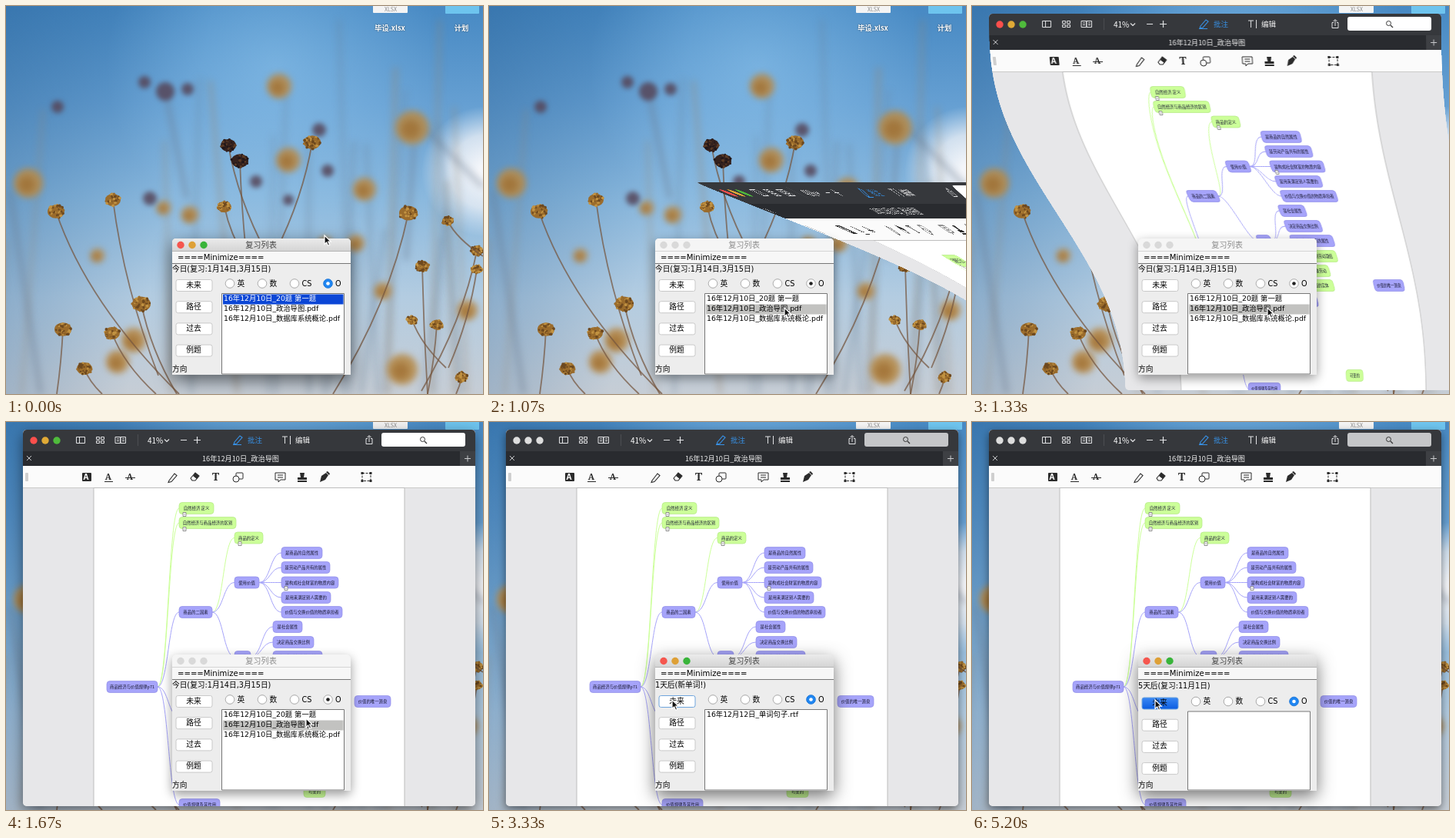
These frames come from a looping animation (620 by 504 pixels, 5.33 s). An HTML page with a canvas:

```html
<!DOCTYPE html>
<html lang="zh">
<head>
<meta charset="utf-8">
<title>复习列表</title>
<style>
html, body { margin: 0; width: 100%; height: 100%; overflow: hidden; }
canvas { display: block; width: 620px; height: 504px; }
</style>
</head>
<body>
<canvas id="stage" width="620" height="504"></canvas>
<script>
const W = 620, H = 504, LOOP = 5330;
const CJK = '"Noto Sans CJK SC", "Noto Sans CJK JP", sans-serif';
const UI = '"DejaVu Sans", ' + CJK;
const stage = document.getElementById('stage').getContext('2d');

let seed = 7;
const random = () => (seed = seed * 16807 % 2147483647) / 2147483647;
const clamp = u => Math.min(1, Math.max(0, u));
const smooth = u => u * u * (3 - 2 * u);

function layer(draw) {
  const canvas = document.createElement('canvas');
  canvas.width = W;
  canvas.height = H;
  draw(canvas.getContext('2d'));
  return canvas;
}
function text(c, str, x, y, size, color = '#000', align = 'left', family = UI, weight = '') {
  c.font = `${weight} ${size}px ${family}`;
  c.fillStyle = color;
  c.textAlign = align;
  c.textBaseline = 'middle';
  c.fillText(str, x, y);
}
function box(c, x, y, w, h, r, fill, stroke, line = 1) {
  c.beginPath();
  c.roundRect(x, y, w, h, r);
  if (fill) { c.fillStyle = fill; c.fill(); }
  if (stroke) { c.strokeStyle = stroke; c.lineWidth = line; c.stroke(); }
}
function dot(c, x, y, r, fill, stroke) {
  c.beginPath();
  c.arc(x, y, r, 0, 7);
  if (fill) { c.fillStyle = fill; c.fill(); }
  if (stroke) { c.strokeStyle = stroke; c.lineWidth = 1; c.stroke(); }
}
function path(c, d, stroke, line = 1, fill) {
  const p = new Path2D(d);
  if (fill) { c.fillStyle = fill; c.fill(p); }
  if (stroke) { c.strokeStyle = stroke; c.lineWidth = line; c.stroke(p); }
}
function shadow(c, x, y, w, h, blur, alpha) {
  c.save();
  c.shadowColor = `rgba(0,0,0,${alpha})`;
  c.shadowBlur = blur;
  c.shadowOffsetY = blur / 3;
  box(c, x, y, w, h, 5, '#ddd');
  c.restore();
}
function gradient(c, coords, ...colors) {
  const g = coords.length === 4 ? c.createLinearGradient(...coords) : c.createRadialGradient(...coords);
  colors.forEach((color, i) => g.addColorStop(i / (colors.length - 1), color));
  return g;
}

// x, y, radius of out-of-focus heads
const hazy = [[29,230,19],[355,104,16],[528,158,22],[367,200,16],[119,324,9],[239,271,11],
  [466,238,15],[145,462,15],[166,434,16],[515,472,20],[490,370,11],[600,395,13],[455,308,11],[205,262,9],[415,308,9]];
const hazyDark = [[180,99,8],[207,111,12],[236,108,8],[67,131,8],[407,161,9],[187,250,9],[325,228,8],[418,214,8],[367,252,7]];
// x, y, radius, then where the stem leaves the picture
const flowers = [[65,267,11,225,504],[139,252,10,198,480],[284,261,9,312,330],[398,177,11,350,320],
  [523,269,12,425,504],[541,338,9,548,504],[612,318,8,540,500],[74,420,11,66,504],[176,387,12,222,504],
  [102,471,10,125,504],[528,408,7,572,470],[560,414,8,548,504],[574,279,7,620,325],[612,342,7,575,470],
  [138,425,10,195,504],[592,482,8,585,504]];
const darkFlowers = [[289,181,10,338,320],[304,201,11,312,320]];

function flower(c, [x, y, r, ex, ey], tones) {
  path(c, `M${x} ${y}Q${x + (ex - x) * .25} ${(y + ey) / 2} ${ex} ${ey}`, '#76563fbb', 1.8);
  c.save();
  c.translate(x, y);
  c.beginPath();
  c.ellipse(0, 0, r, r * .8, 0, 0, 7);
  c.fillStyle = tones[1];
  c.fill();
  for (let i = 0; i < 45; i++) {
    const a = random() * 6.3, d = Math.sqrt(random()) * r;
    dot(c, Math.cos(a) * d, Math.sin(a) * d * .8, 1 + random(), tones[Math.floor(random() * 3)]);
  }
  c.restore();
}

const desktop = layer(c => {
  c.fillStyle = gradient(c, [0, 0, 0, H], '#4789c3', '#659fd2', '#8bb9de', '#b3cce1', '#c6cdd5');
  c.fillRect(0, 0, W, H);
  c.fillStyle = gradient(c, [0, 0, 260, 60], '#245b9066', '#245b9000');
  c.fillRect(0, 0, W, H);
  c.fillStyle = gradient(c, [350, 80, 0, 350, 80, 220], '#9bd0f577', '#9bd0f500');
  c.fillRect(0, 0, W, H);
  c.fillStyle = gradient(c, [625, 215, 10, 625, 215, 85], '#f4f6fa', '#e9eef5cc', '#dce8f500');
  c.fillRect(0, 0, W, H);
  c.filter = 'blur(5px)';
  for (let i = 0; i < 22; i++) {
    const x = random() * W, y = random() * 330;
    path(c, `M${x} ${y}L${x + random() * 80 - 40} ${H}`, i % 3 ? '#6a7f9455' : '#9a866c66', 3 + random() * 4);
  }
  path(c, 'M545 160L620 235M5 240L45 504M530 180L520 330M207 110L235 250', '#6c788b88', 5);
  c.filter = 'blur(4px)';
  hazy.forEach(([x, y, r]) => {
    dot(c, x, y, r, '#b78b4be0');
    dot(c, x - 2, y + 2, r * .55, '#9c6a2daa');
  });
  c.filter = 'blur(3px)';
  hazyDark.forEach(([x, y, r]) => dot(c, x, y, r, '#55465add'));
  c.filter = 'blur(.6px)';
  flowers.forEach(f => flower(c, f, ['#c29342', '#9b6c2c', '#6e491f']));
  darkFlowers.forEach(f => flower(c, f, ['#5c3b25', '#35221e', '#221719']));
  c.filter = 'none';

  box(c, 477, -8, 45, 17, 1, '#f4f4f4');
  text(c, 'XLSX', 500, 4, 7, '#888', 'center', CJK);
  box(c, 571, -8, 44, 18, 1, '#6ec4ee');
  c.shadowColor = '#0008';
  c.shadowBlur = 2;
  text(c, '毕设.xlsx', 499, 28, 9.3, '#fff', 'center', CJK, 'bold');
  text(c, '计划', 592, 28, 9.3, '#fff', 'center', CJK, 'bold');
});

const PURPLE = '#a6a4fa', GREEN = '#ccff99';
// label, left, right, y, parent index, color
const nodes = [
  ['商品经济与价值规律p71', 131, 197, 344, -1, PURPLE],
  ['自然经济 定义', 225, 270, 112, 0, GREEN],
  ['自然经济与商品经济的区别', 225, 299, 131, 0, GREEN],
  ['商品的二因素', 225, 268, 247, 0, PURPLE],
  ['商品的定义', 297, 334, 150.5, 3, GREEN],
  ['使用价值', 297, 329, 208.5, 3, PURPLE],
  ['价值', 297, 318, 305, 3, PURPLE],
  ['是商品的自然属性', 358, 411, 170, 5, PURPLE],
  ['是劳动产品共有的属性', 358, 421, 189, 5, PURPLE],
  ['是构成社会财富的物质内容', 358, 432, 208.5, 5, PURPLE],
  ['是用来满足别人需要的', 358, 422, 228, 5, PURPLE],
  ['价值与交换价值的物质承担者', 358, 437, 247, 5, PURPLE],
  ['是社会属性', 347, 385, 266, 6, PURPLE],
  ['决定商品交换比例', 347, 400, 286, 6, PURPLE],
  ['商品经济特有的属性', 347, 411, 305, 6, PURPLE],
  ['人类无差别劳动凝结', 347, 408, 325, 6, GREEN],
  ['抽象劳动', 358, 390, 344, 6, GREEN],
  ['价值的实体', 347, 390, 363, 6, GREEN],
  ['劳动二重性', 225, 264, 383, 0, PURPLE],
  ['具体劳动与抽象劳动', 297, 358, 383, 18, PURPLE],
  ['价值量', 297, 325, 402, 18, PURPLE],
  ['价值的唯一源泉', 453, 500, 363, -1, PURPLE],
  ['可变的', 387, 415, 480, -1, GREEN],
  ['价值规律及其作用', 225, 278, 497, 0, PURPLE]
];

function mindMap(c) {
  nodes.forEach(([, left, , y, parent, color]) => {
    if (parent < 0) return;
    const [, , px, py] = nodes[parent], mid = (px + left) / 2;
    path(c, `M${px} ${py}C${mid} ${py} ${mid} ${y} ${left} ${y}`, color, 1);
  });
  nodes.forEach(([label, left, right, y, , color]) => {
    box(c, left, y - 7.5, right - left, 15, 4, color, color === GREEN ? '#b5e886' : '#918fe8', .7);
    text(c, label, (left + right) / 2, y, 5.4, '#181830', 'center', CJK, '500');
  });
  [[232, 120], [232, 139], [304, 158], [364, 216]].forEach(([x, y]) => {
    box(c, x - 2, y - 2.5, 4, 5, 0, '#fff', '#777', .8);
    path(c, `M${x - 1} ${y}h2`, '#777', .6);
  });
}

function lights(c, x, y, colors) {
  colors.forEach((color, i) => dot(c, x + i * 15, y, 4.7, color));
}

const reader = active => layer(c => {
  const pale = '#e2e3e5', blue = '#3792e8', ink = '#2b2b2b';
  box(c, 22, 10, 588, 489, 5);
  c.clip();
  c.fillStyle = '#e7e7e9';
  c.fillRect(22, 10, 588, 489);
  c.fillStyle = '#36383c';
  c.fillRect(22, 10, 588, 28);
  c.fillStyle = '#292b2f';
  c.fillRect(22, 38, 588, 19);
  c.fillStyle = '#3e4044';
  c.fillRect(590, 38, 20, 19);
  c.fillStyle = '#fbfbfb';
  c.fillRect(22, 57, 588, 28);
  c.fillStyle = '#c9c9c9';
  c.fillRect(22, 85, 588, 1);
  box(c, 114, 85.5, 404, 430, 0, '#fff', '#bdbdbd');

  lights(c, 36, 24, active ? ['#fc4f4c', '#e0aa36', '#4fbb3c'] : ['#dedede', '#dedede', '#dedede']);
  path(c, 'M91.500 19.500h11v8h-11zM95.500 19.500v8M117.500 19.500h4v3h-4zM123.500 19.500h4v3h-4zM117.500 24.500h4v3h-4zM123.500 24.500h4v3h-4z', pale);
  path(c, 'M142 19.500h6.500v8h-6.500zM149 19.500h6.500v8h-6.500zM144 22h3M144 24.500h3M151 22h3M151 24.500h3', pale);
  path(c, 'M171.500 16v15', '#4c4e52');
  text(c, '41%', 184, 24, 10, '#fff', 'left', CJK);
  path(c, 'M206 22.500l3 3 3-3M227 23.500h8M244 23.500h9M248.500 19v9', pale, 1.2);
  path(c, 'M297 26l7-8 3 2-7 8-4 1zM295 29.500h11', blue, 1.1);
  text(c, '批注', 314, 23.5, 9.5, blue, 'left', CJK);
  path(c, 'M359 19h7M362.500 19v9M369.500 18v11', pale);
  text(c, '编辑', 376, 23.5, 9.5, '#f4f4f4', 'left', CJK);
  path(c, 'M470 21.500h-2v7h8v-7h-2M472 26v-8M469.500 20l2.500-2.500 2.500 2.500', pale);
  box(c, 488, 14, 109, 18, 3, active ? '#fff' : '#c5c6c8');
  dot(c, 541.5, 22.5, 3, null, '#333');
  path(c, 'M544 25l3 3M', '#333', 1.2);

  path(c, 'M27 44l6 6M33 44l-6 6M596 47.500h8M600 43.500v8', '#c9cacc');
  text(c, '16年12月10日_政治导图', 305, 47.5, 9.2, '#f0f0f0', 'center', CJK);

  box(c, 25, 66, 4, 11, 1, '#cfcfcf');
  box(c, 99, 66, 12, 11, 1, ink);
  text(c, 'A', 104, 72, 10, '#fff', 'center', 'Inter, sans-serif', 'bold');
  ['A', 'A'].forEach((a, i) => text(c, a, 133 + i * 28, 71.5, 11, ink, 'center', '"Noto Serif", serif', 'bold'));
  path(c, 'M128 77.500h11M155 72.500h13', ink, 1.2);
  path(c, 'M212 76l7-9 3 2.500-7 8-4 1zM240 73l6-7 5 4-5 6h-4z', ink, 1.1);
  path(c, 'M246 66l5 4-3 4-5-4z', null, 1, ink);
  text(c, 'T', 272.5, 72, 14, ink, 'center', '"Noto Serif", serif', 'bold');
  box(c, 299, 66, 9, 8, 1, '#fbfbfb', ink);
  dot(c, 299, 74, 4, '#fbfbfb', ink);
  path(c, 'M350 66h13v9h-6l-3 3v-3h-4zM353 69h7M353 72h7', ink);
  path(c, 'M382 66h6l-1 6h4v3h-12v-3h4zM379 76h12v2h-12zM408 78l2-8 6-4 3 3-4 6zM416 65l2-1 3 3-1 2z', null, 1, ink);
  c.setLineDash([3, 1.5]);
  box(c, 463, 66.5, 11, 10, 0, null, ink);
  c.setLineDash([]);
  [[463, 66.5], [474, 66.5], [463, 76.5], [474, 76.5]].forEach(([x, y]) => box(c, x - 1.5, y - 1.5, 3, 3, 0, ink));
  mindMap(c);
});
const activeReader = reader(true), idleReader = reader(false);

// The window slides up along an S-shaped funnel, then the funnel straightens.
function drawReader(t) {
  if (t < 930) return;
  const image = t < 2730 ? activeReader : idleReader;
  const top = Math.round(530 - 520 * clamp((t - 930) / 242));
  const warp = 1 - clamp((t - 1125) / 275);
  if (!warp) {
    shadow(stage, 22, 10, 588, 489, t < 2730 ? 18 : 12, .5);
    stage.drawImage(image, 0, 0);
    return;
  }
  for (let y = top; y < Math.min(H, top + 489); y++) {
    const u = clamp((y - 10) / 520);
    const bend = u * u * u * (10 - 15 * u + 6 * u * u) * warp;
    const left = 22 + 698 * bend, right = 610 + 207 * bend;
    stage.drawImage(image, 22, y - top + 10, 588, 1, left, y, right - left, 1);
  }
}

const words = day => `16年12月${day}日_单词句子.rtf`;
const today = '今日(复习:1月14日,3月15日)';
const screens = [
  [0, today, ['16年12月10日_20题 第一题', '16年12月10日_政治导图.pdf', '16年12月10日_数据库系统概论.pdf']],
  [2930, today, [words(11), '16年12月11日_政治导图.pdf']],
  [3330, '1天后(新单词!)', [words(12)]],
  [3730, '2天后(新单词!)', [words(13)]],
  [4130, '3天后(新单词!)', [words(14)]],
  [4530, '4天后(复习:12月1日)', [words(15), '16年12月1日_政治导图.pdf', '16年12月1日_20题 第一题']],
  [4870, '5天后(复习:11月1日)', []]
];
const presses = [[2800, 2930], [3130, 3330], [3600, 3730], [4000, 4130], [4400, 4530], [4730, 4870], [5200, LOOP]];

function drawDialog(t) {
  const c = stage;
  const focused = t < 870 || t >= 2730;
  const pressed = presses.some(([from, to]) => t >= from && t < to);
  const [, label, rows] = screens.findLast(s => t >= s[0]);
  const shift = rows.length ? 0 : 2.5;

  shadow(c, 216, 302, 232, 177, focused ? 22 : 14, focused ? .55 : .4);
  c.save();
  box(c, 216, 302, 232, 177, [5, 5, 0, 0], '#ededed');
  c.clip();
  c.fillStyle = focused ? gradient(c, [0, 302, 0, 319], '#ebebeb', '#d3d3d3') : '#f5f5f5';
  c.fillRect(216, 302, 232, 17);
  c.fillStyle = focused ? '#b5b5b5' : '#d5d5d5';
  c.fillRect(216, 318, 232, 1);
  c.fillStyle = '#f7f7f7';
  c.fillRect(216, 319, 232, 15);
  c.fillStyle = '#777';
  c.fillRect(216, 334, 232, 1);
  c.restore();

  lights(c, 227, 310.5, focused ? ['#f5564e', '#dea036', '#39b43a'] : ['#d9d9d9', '#d9d9d9', '#d9d9d9']);
  text(c, '复习列表', 331.5, 310.5, 10.2, focused ? '#444' : '#8d8d8d', 'center', CJK);
  text(c, '====Minimize====', 223, 327.5, 10.1);
  text(c, label, 216, 342 + shift / 2, 9.7);

  ['未来', '路径', '过去', '例题'].forEach((name, i) => {
    const y = 363 + i * 28.2 + shift, first = i === 0;
    const fill = first && pressed ? gradient(c, [0, y - 8, 0, y + 8], '#3d8bf5', '#0a5be0') : '#fff';
    box(c, 221, y - 7.5, 47, 15, 2.5, fill, first && t >= 2930 ? '#6fa5dd' : '#c9c9c9');
    text(c, name, 244, y, 9.8, '#000', 'center');
  });
  text(c, '方向', 216, 472 + shift / 3, 9.7);

  [[291, '英'], [333, '数'], [375, 'CS'], [418.5, 'O']].forEach(([x, name], i) => {
    const y = 360.5 + shift, on = i === 3;
    dot(c, x, y, 5.8, on && focused ? '#1f86f2' : '#fff', on && focused ? '#1a75d8' : '#a9a9a9');
    if (on) dot(c, x, y, 2.3, focused ? '#fff' : '#222');
    text(c, name, x + 9.5, y + .5, 9.7);
  });

  box(c, 280.5, 373.5 + shift, 159, 104.5 - shift, 0, '#fff', '#777');
  const selected = t >= 2930 ? -1 : t < 670 ? 0 : 1;
  rows.forEach((row, i) => {
    const y = 381 + i * 13;
    if (i === selected) {
      c.fillStyle = focused ? '#0b46d6' : '#c2c2c0';
      c.fillRect(282, y - 6.5, 156.5, 13);
    }
    text(c, row, 283, y, 9.3, i === selected && focused ? '#fff' : '#000');
  });
}

// time, x, y of the pointer tip
const pointer = [[0, 414, 298], [470, 384, 392], [1400, 384, 392], [1670, 390, 385], [2000, 390, 385], [2400, 238, 361], [LOOP, 238, 361]];
function drawPointer(t) {
  const i = pointer.findIndex(p => p[0] > t);
  const [t0, x0, y0] = pointer[i - 1], [t1, x1, y1] = pointer[i];
  const u = smooth(clamp((t - t0) / (t1 - t0)));
  stage.save();
  stage.translate(x0 + (x1 - x0) * u, y0 + (y1 - y0) * u);
  path(stage, 'M0 0V11.500L2.700 9L4.600 13.300L6.700 12.400L4.800 8.200H8.200Z', '#fff', 1.2, '#111');
  stage.restore();
}

function frame(now) {
  const step = Math.floor((now % LOOP + 4) * 15 / 1000);
  const t = Math.min(LOOP - 1, Math.round(step * 20 / 3) * 10);
  stage.drawImage(desktop, 0, 0);
  drawReader(t);
  drawDialog(t);
  drawPointer(t);
  requestAnimationFrame(frame);
}
requestAnimationFrame(frame);
</script>
</body>
</html>
```
